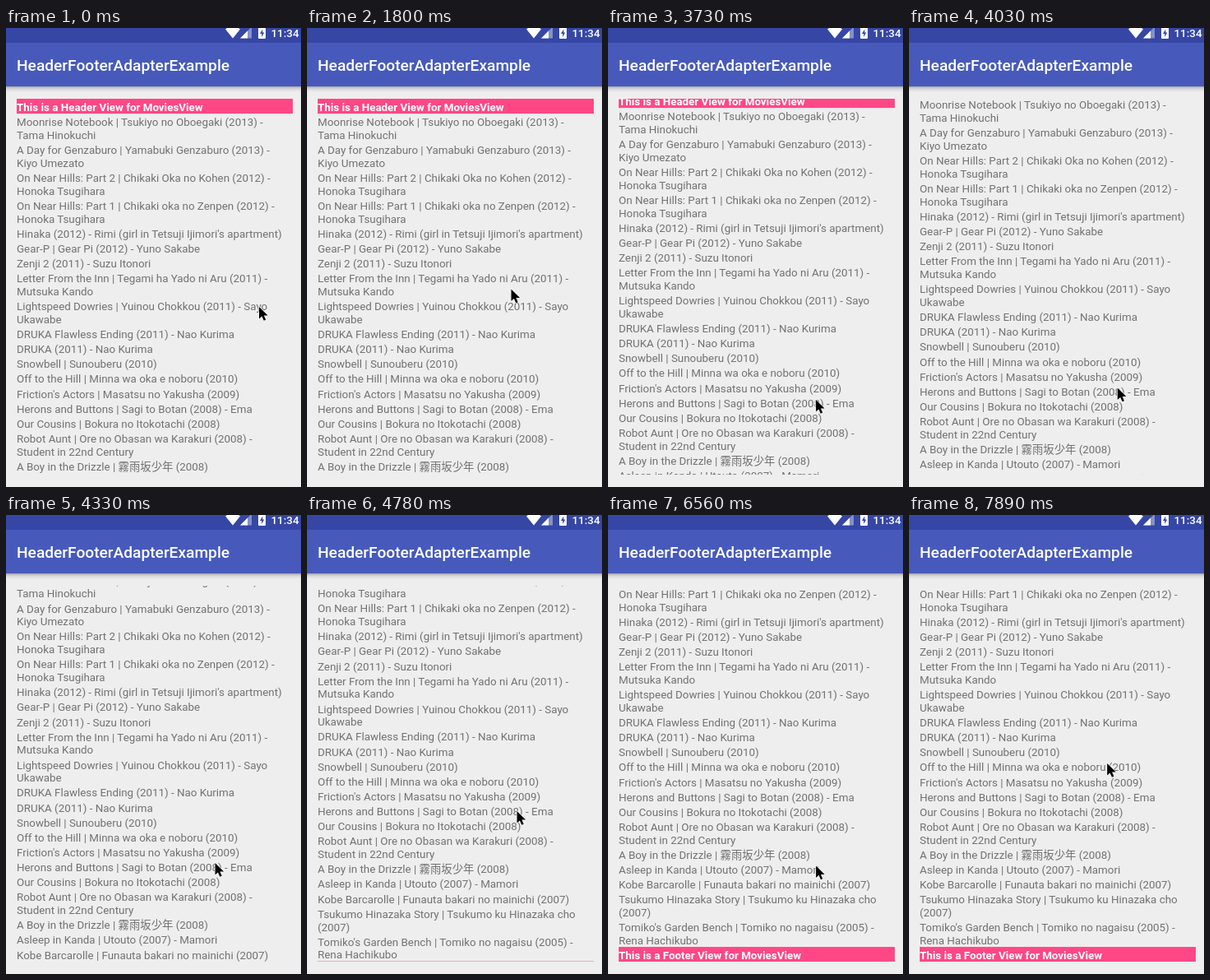
Animation of 359 by 558 pixels, one loop 8 s. Source, as an HTML page:

```html
<!DOCTYPE html>
<html lang="en">
<head>
<meta charset="utf-8">
<title>HeaderFooterAdapterExample</title>
<style>
  html, body { margin: 0; width: 100%; height: 100%; overflow: hidden; background: #eee; }
  svg { display: block; }
  text { font-family: Roboto, "Noto Sans CJK JP", "Noto Sans CJK", sans-serif; white-space: pre; }
  #list text { font-size: 13.37px; fill: #717171; }
  #list .banner { font-weight: 700; fill: #fff; }
</style>
</head>
<body>
<svg id="stage" width="359" height="558" viewBox="0 0 359 558">
  <defs>
    <linearGradient id="shade" x1="0" y1="0" x2="0" y2="1">
      <stop offset="0" stop-color="#000" stop-opacity=".3"/>
      <stop offset=".4" stop-color="#000" stop-opacity=".1"/>
      <stop offset="1" stop-color="#000" stop-opacity="0"/>
    </linearGradient>
  </defs>
  <rect width="359" height="558" fill="#eee"/>
  <rect y="71" width="359" height="7" fill="url(#shade)"/>
  <rect y="18" width="359" height="53" fill="#475abc"/>
  <rect width="359" height="18" fill="#3646a5"/>

  <g fill="#fff">
    <path d="M276 12.5L267 1.5Q271-2 276-2T285 1.5Z"/>
    <path d="M285 12.5L299-1.5V12.5Z" opacity=".4"/>
    <path d="M285 12.5L294 3.5V12.5Z"/>
    <rect x="307" y="-1" width="9" height="14" rx="1"/>
    <path d="M312.3 1.5L309 7H311.2V11L314.2 5.6H312.3Z" fill="#3646a5"/>
    <text x="322.5" y="11.3" font-size="13.4" font-weight="500">11:34</text>
    <text x="13" y="52" font-size="19.15" font-weight="500">HeaderFooterAdapterExample</text>
  </g>

  <svg x="13" y="86" width="336" height="457" overflow="hidden"><g id="list"></g></svg>

  <path id="cursor" d="M0 0V14.6L3.4 11.4L5.8 16.8L8.2 15.8L5.9 10.6H10.6Z"
        fill="#000" stroke="#fff" stroke-width="1.1" paint-order="stroke" stroke-linejoin="round"/>
</svg>
<script>
const FIRST_LINE = 18.14, NEXT_LINE = 15.76, BASELINE = 15;
const LOOP = 8000, FIRST_STEP = 600, STEP = 148.8;

// "/" marks a line break inside a row
const movies = `Moonrise Notebook | Tsukiyo no Oboegaki (2013) -/Tama Hinokuchi
A Day for Genzaburo | Yamabuki Genzaburo (2013) -/Kiyo Umezato
On Near Hills: Part 2 | Chikaki Oka no Kohen (2012) -/Honoka Tsugihara
On Near Hills: Part 1 | Chikaki oka no Zenpen (2012) -/Honoka Tsugihara
Hinaka (2012) - Rimi (girl in Tetsuji Ijimori's apartment)
Gear-P | Gear Pi (2012) - Yuno Sakabe
Zenji 2 (2011) - Suzu Itonori
Letter From the Inn | Tegami ha Yado ni Aru (2011) -/Mutsuka Kando
Lightspeed Dowries | Yuinou Chokkou (2011) - Sayo/Ukawabe
DRUKA Flawless Ending (2011) - Nao Kurima
DRUKA (2011) - Nao Kurima
Snowbell | Sunouberu (2010)
Off to the Hill | Minna wa oka e noboru (2010)
Friction's Actors | Masatsu no Yakusha (2009)
Herons and Buttons | Sagi to Botan (2008) - Ema
Our Cousins | Bokura no Itokotachi (2008)
Robot Aunt | Ore no Obasan wa Karakuri (2008) -/Student in 22nd Century
A Boy in the Drizzle | 霧雨坂少年 (2008)
Asleep in Kanda | Utouto (2007) - Mamori
Kobe Barcarolle | Funauta bakari no mainichi (2007)
Tsukumo Hinazaka Story | Tsukumo ku Hinazaka cho/(2007)
Tomiko's Garden Bench | Tomiko no nagaisu (2005) -/Rena Hachikubo`.split("\n");

// step, cursor x, cursor y, list scroll
const poses = [
  [-1, 308, 339, 0],
  [2, 248.5, 317.5, 0],
  [8, 248.5, 317.5, 0],
  [11, 249, 443, 0],
  [13, 249, 443, 0],
  [19, 253, 459, 0],
  [21, 253, 452, 7],
  [25, 254.5, 423, 34.5],
  [28, 255.5, 360, 102.5],
  [30, 255, 352, 110],
  [36, 250, 467, 110],
  [37, 251, 457, 120],
  [42, 254.5, 406, 120],
  [46, 254.5, 406, 120],
  [49, 234.5, 250, 120]
];

const list = document.getElementById("list");
const cursor = document.getElementById("cursor");

function add(tag, attributes, content = "") {
  const node = document.createElementNS("http://www.w3.org/2000/svg", tag);
  for (const name in attributes) node.setAttribute(name, attributes[name]);
  node.textContent = content;
  list.append(node);
}

function addBanner(top, label) {
  add("rect", { y: top, width: 336, height: FIRST_LINE, fill: "#ff4785" });
  add("text", { y: top + BASELINE, class: "banner" }, label);
  return top + FIRST_LINE;
}

function addRow(top, row) {
  const lines = row.split("/");
  lines.forEach((line, i) => add("text", { y: top + BASELINE + i * NEXT_LINE }, line));
  return top + FIRST_LINE + (lines.length - 1) * NEXT_LINE;
}

function poseAt(step) {
  const next = poses.findIndex(pose => pose[0] >= step);
  if (next < 0) return poses[poses.length - 1];
  if (next === 0) return poses[0];
  const from = poses[next - 1], to = poses[next];
  const part = (step - from[0]) / (to[0] - from[0]);
  return from.map((value, i) => value + (to[i] - value) * part);
}

function draw(time) {
  const step = Math.max(-1, Math.floor((time - FIRST_STEP) / STEP));
  const [, x, y, scroll] = poseAt(step);
  cursor.setAttribute("transform", `translate(${x} ${y})`);
  list.setAttribute("transform", `translate(0 ${-scroll})`);
}

const footerTop = movies.reduce(addRow, addBanner(0, "This is a Header View for MoviesView"));
addBanner(footerTop, "This is a Footer View for MoviesView");

const start = performance.now();
function tick() {
  draw((performance.now() - start) % LOOP);
  requestAnimationFrame(tick);
}
tick();
</script>
</body>
</html>
```
